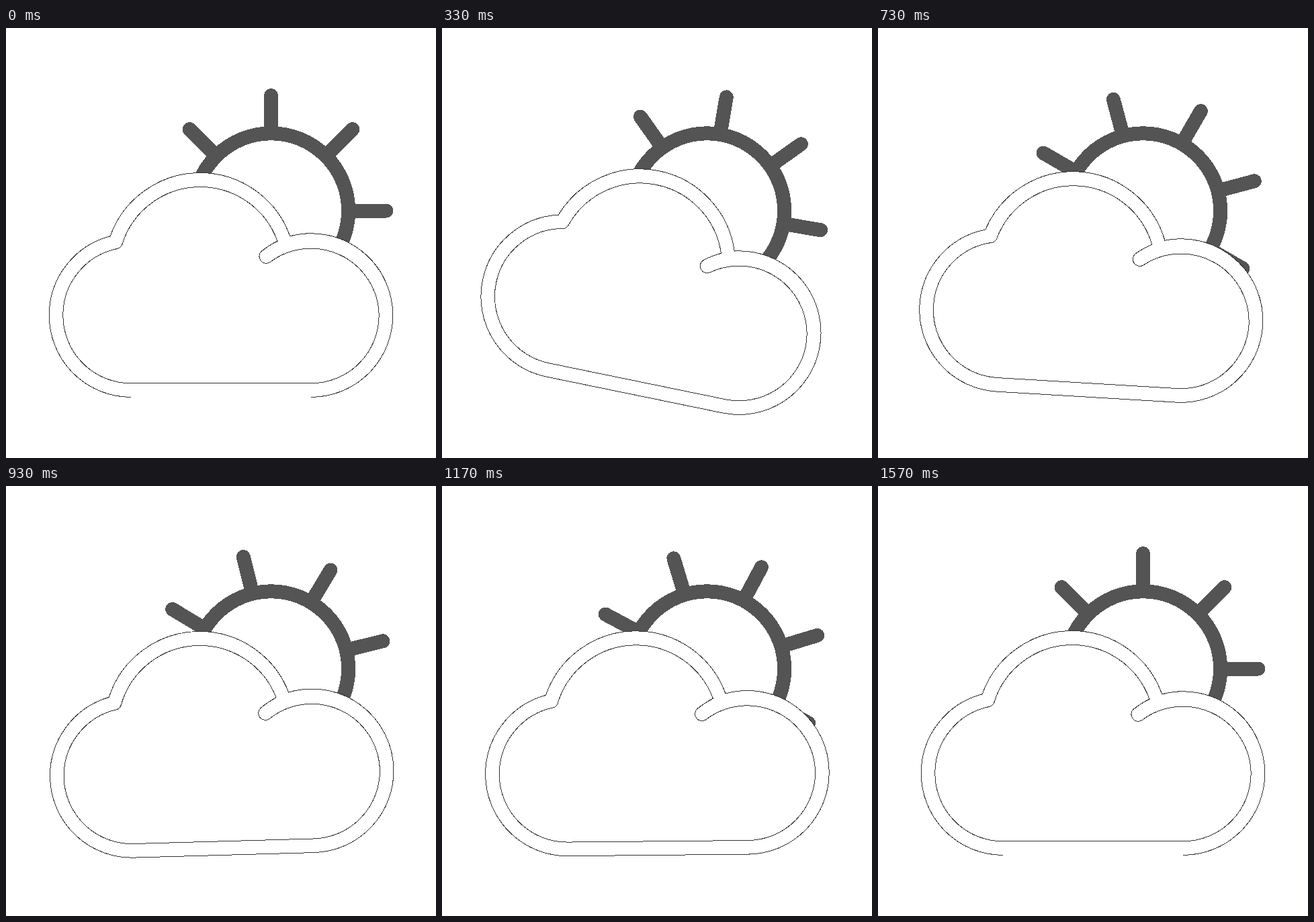
An HTML page that plays this animation: 640x640 px, repeating every 1.67 s.

```html
<!DOCTYPE html>
<html lang="en">
<head>
<meta charset="utf-8">
<title>Sun and cloud</title>
<style>
  html, body { margin: 0; width: 100%; height: 100%; overflow: hidden; background: #fff; }
  svg { display: block; width: 100%; height: 100%; }
</style>
</head>
<body>
<svg viewBox="0 0 640 640" shape-rendering="crispEdges" fill="none">
  <g id="sun" stroke="#545454" stroke-width="21" stroke-linecap="round">
    <circle cx="394.5" cy="272" r="115.2"/>
    <g id="rays"></g>
  </g>
  <g id="cloud" stroke="#333" stroke-width="1">
    <path fill="#fff" stroke="none" d="M186 549.4A121.8 121.8 0 0 1 64.2 427.6A121.8 121.8 0 0 1 155.2 309.8A142 142 0 0 1 422.7 309.9A121.8 121.8 0 0 1 575.8 427.6A121.8 121.8 0 0 1 454 549.4Z"/>
    <path d="M186 549.4A121.8 121.8 0 0 1 64.2 427.6A121.8 121.8 0 0 1 155.2 309.8A142 142 0 0 1 422.7 309.9A121.8 121.8 0 0 1 575.8 427.6A121.8 121.8 0 0 1 454 549.4"/>
    <path d="M186 528.8A101.2 101.2 0 0 1 84.8 427.6A101.2 101.2 0 0 1 167 328.2A10.5 10.5 0 0 0 173 321.5A122 122 0 0 1 404 317.2A121.8 121.8 0 0 0 380 332.5A10.4 10.4 0 0 0 393 348.6A101.2 101.2 0 0 1 555.2 427.6A101.2 101.2 0 0 1 454 528.8Z"/>
    <path id="base" d="M186 549.4H454"/>
  </g>
</svg>
<script>
const LOOP = 1670, STEP = 100 / 3, LAST = 47;
const $ = id => document.getElementById(id);
const rays = $('rays'), cloud = $('cloud'), base = $('base');

for (let a = 0; a < 360; a += 45) {
  const ray = document.createElementNS('http://www.w3.org/2000/svg', 'path');
  ray.setAttribute('d', 'M394.5 152V100.5');
  ray.setAttribute('transform', `rotate(${a} 394.5 272)`);
  rays.append(ray);
}

// Keys: time in ms, angle in degrees, slope in degrees per ms
const swing = [[0, 0, 0], [275, 15, 0], [510, -7, 0], [745, 3.5, 0], [970, -2, 0], [1270, 0, 0]];
const spin = [[180, 0, 0], [333, 9.6, .19], [533, 99, .5], [733, 209.9, .51],
              [933, 301, .3], [1167, 343.2, .09], [1567, 360, 0]];

function hermite(keys, t) {
  if (t <= keys[0][0]) return keys[0][1];
  const i = keys.findIndex(k => k[0] > t);
  if (i < 0) return keys[keys.length - 1][1];
  const [t0, v0, m0] = keys[i - 1], [t1, v1, m1] = keys[i];
  const d = t1 - t0, u = (t - t0) / d, w = 1 - u;
  return v0 * (1 + 2 * u) * w * w + v1 * u * u * (3 - 2 * u)
       + d * u * w * (m0 * w - m1 * u);
}

function draw(ms) {
  // The motion runs at 30 poses per second, then rests
  const t = Math.min(LAST, Math.floor((ms % LOOP + 3.4) / STEP)) * STEP;
  const tilt = hermite(swing, t);
  rays.setAttribute('transform', `rotate(${hermite(spin, t)} 394.5 272)`);
  cloud.setAttribute('transform', `rotate(${tilt} 320 382.7)`);
  // A level lower edge melts into the background
  base.setAttribute('visibility', Math.abs(tilt) < .02 ? 'hidden' : 'visible');
}

const start = performance.now();
function tick() {
  draw(performance.now() - start);
  requestAnimationFrame(tick);
}
tick();
</script>
</body>
</html>
```
